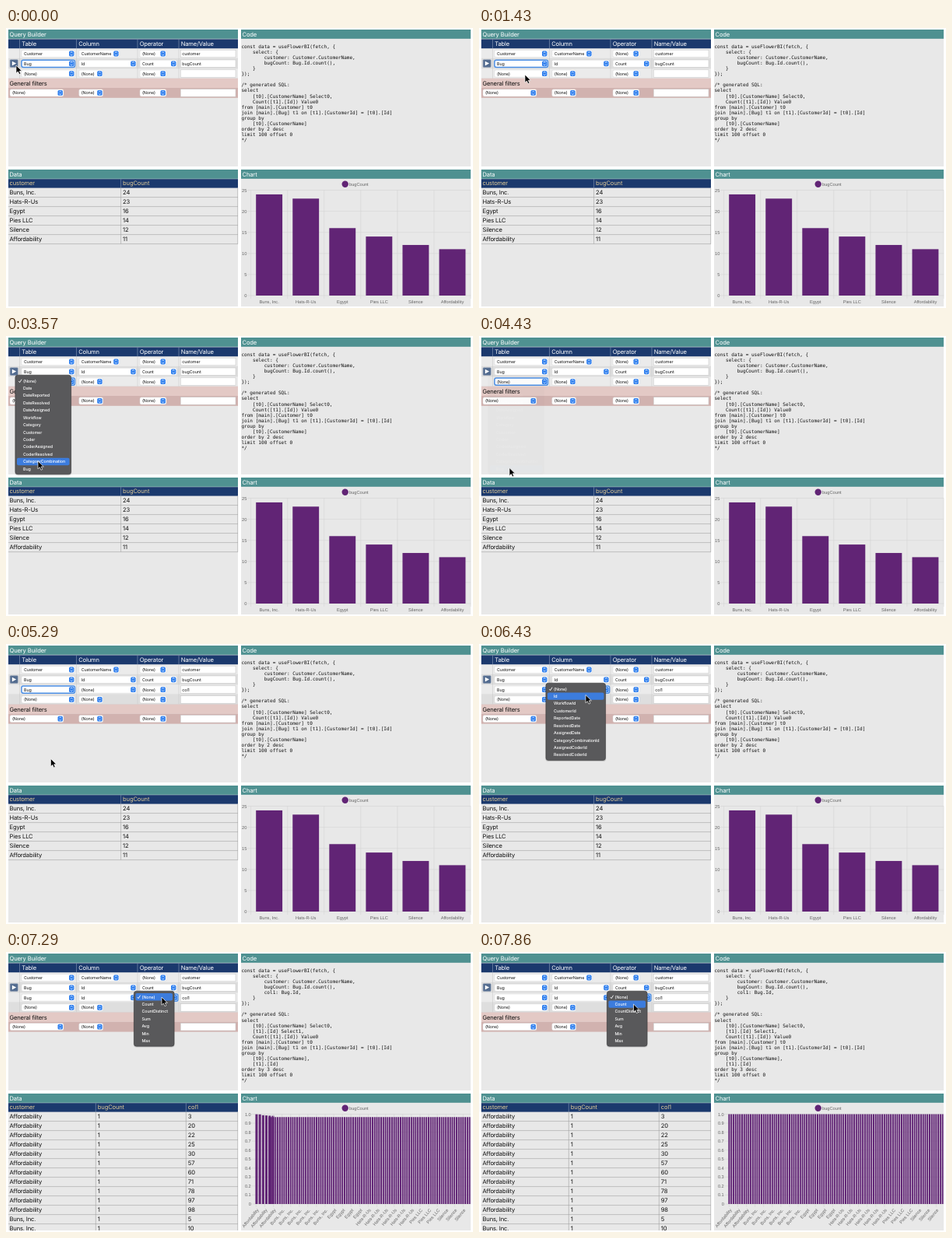
Recreate the animation shown at these times as an HTML page. Size 600 by 360 pixels, loop 8000 ms.

```html
<!DOCTYPE html>
<html lang="en">
<head>
<meta charset="utf-8">
<title>Query builder</title>
<style>
  html, body { margin: 0; width: 100%; height: 100%; overflow: hidden; background: #fff; }
  svg { display: block; width: 600px; height: 360px; }
  text { font: 7.6px Inter, "Noto Sans", sans-serif; letter-spacing: -.02em; fill: #111; text-rendering: geometricPrecision; }
  .light { fill: #fff; }
  .gold { fill: #dcc896; }
  .small { font-size: 5.4px; }
  .item { font-size: 5.35px; font-weight: 500; fill: #fff; }
  .code { font: 6.08px "DejaVu Sans Mono", monospace; letter-spacing: 0; }
  .axis { font: 5.7px "Liberation Sans", Arial, sans-serif; letter-spacing: 0; fill: #666; }
  .end { text-anchor: end; }
  .mid { text-anchor: middle; }
</style>
</head>
<body>
<svg id="stage" viewBox="0 0 600 360" xmlns="http://www.w3.org/2000/svg"></svg>
<script>
const LOOP = 8000, FPS = 7;
const TEAL = '#4f9191', NAVY = '#1b396d', GREY = '#e8e8e8', PURPLE = '#612475';
// Frame numbers of the hard changes
const TABLE_OPEN = 14, TABLE_PICK = 30, ROW_ADDED = 32;
const COLUMN_OPEN = 43, COLUMN_PICK = 47, OPERATOR_OPEN = 50;
const CHART_START = 6710, CHART_TIME = 1000;

const MENUS = [
  { x: 12, w: 71.5, open: TABLE_OPEN, fade: TABLE_PICK, items: ['(None)', 'Date', 'DateReported',
    'DateResolved', 'DateAssigned', 'Workflow', 'Category', 'Customer', 'Coder', 'CoderAssigned',
    'CoderResolved', 'CategoryCombination', 'Bug'] },
  { x: 86, w: 76.5, open: COLUMN_OPEN, fade: COLUMN_PICK, items: ['(None)', 'Id', 'WorkflowId',
    'CustomerId', 'ReportedDate', 'ResolvedDate', 'AssignedDate', 'CategoryCombinationId',
    'AssignedCoderId', 'ResolvedCoderId'] },
  { x: 164.5, w: 51.5, open: OPERATOR_OPEN, fade: Infinity, items: ['(None)', 'Count',
    'CountDistinct', 'Sum', 'Avg', 'Min', 'Max'] }
];

// Pointer stops: frame, x, y
const PATH = [[0, 13, 48], [3, 13, 48], [10, 59, 60], [14, 59, 57.5], [18, 49, 124], [20, 49, 125],
  [27, 39, 169.5], [35, 39, 169.5], [42, 132, 58], [45, 137, 65.5], [46, 137, 65.5],
  [50, 200, 58], [51, 200, 58], [55, 198.5, 67]];

const TOTALS = [['Buns, Inc.', 24], ['Hats-R-Us', 23], ['Egypt', 16], ['Pies LLC', 14],
  ['Silence', 12], ['Affordability', 11]];
const GROUPS = [...TOTALS].sort((a, b) => a[0] < b[0] ? -1 : 1);
const NAMES = GROUPS.flatMap(([name, n]) => Array(n).fill(name));
const IDS = [3, 20, 22, 25, 30, 57, 60, 71, 78, 97, 98, 5, 10];

const lerp = (a, b, p) => a + (b - a) * p;
const range = n => [...Array(n).keys()];
const each = (list, fn) => list.map(fn).join('');
const rect = (x, y, w, h, fill, more = '') =>
  `<rect x="${x}" y="${y}" width="${w}" height="${h}" fill="${fill}" ${more}/>`;
const line = (x1, y1, x2, y2, color, w = .6) =>
  `<path d="M${x1} ${y1}L${x2} ${y2}" stroke="${color}" stroke-width="${w}"/>`;
const text = (x, y, s, cls = '', more = '') =>
  `<text x="${x}" y="${y}" class="${cls}" ${more}>${s}</text>`;

function panel(x, y, title) {
  return rect(x, y, 295, 176, GREY) + rect(x, y, 295, 11.8, TEAL) +
    text(x + 1.5, y + 9, title, 'light');
}

function select(x, w, cy, label, focused) {
  const sx = x + w - 7.5;
  return rect(x, cy - 4.6, w, 9.2, '#fff',
      focused ? 'rx="2.2" stroke="#4b8fe6" stroke-width="1.5"' : 'rx="2" stroke="#cfcfcf" stroke-width=".4"') +
    text(x + 3, cy + 2, label, 'small') +
    rect(sx, cy - 3.4, 6.4, 6.8, '#2f7fee', 'rx="1.6"') +
    `<path d="M${sx + 1.8} ${cy - .8}l1.4 -1.5l1.4 1.5m0 1.6l-1.4 1.5l-1.4 -1.5" fill="none" stroke="#fff" stroke-width=".7"/>`;
}

const input = (cy, label) =>
  rect(224.3, cy - 4.8, 70.7, 9.6, '#fff', 'stroke="#c4c4c4" stroke-width=".5"') +
  text(226.3, cy + 2, label, 'small');

function builder(f) {
  const added = f >= ROW_ADDED, picked = f >= COLUMN_PICK;
  const none = '(None)';
  const focus = f < TABLE_OPEN ? [1, 0] : f < COLUMN_OPEN ? [2, 0] : f < OPERATOR_OPEN ? [2, 1] : [2, 2];
  // Each select is [label, width]
  const rows = [
    [['Customer', 68.5], ['CustomerName', 52], [none, 34], 'customer'],
    [['Bug', 68.5], ['Id', 74], ['Count', 47.5], 'bugCount'],
    added
      ? [['Bug', 68.5], [picked ? 'Id' : none, 74], [none, picked ? 49 : 34], 'col1']
      : [[none, 68.5], [none, 31], [none, 34], '']
  ];
  if (added) rows.push([[none, 68.5], [none, 31], [none, 34], '']);
  const xs = [20, 93.7, 172], cols = [17.5, 90.5, 169, 222];
  const bottom = added ? 77.6 : 64.8;

  let s = panel(3, 2, 'Query Builder') + rect(3, 14.4, 295, 12, NAVY);
  s += each(['Table', 'Column', 'Operator', 'Name/Value'], (h, i) => text(cols[i] + 2.7, 23, h, 'light'));
  s += each(rows, (row, r) => {
    const cy = 33 + r * 12.8;
    return rect(3, cy - 6.4, 295, 12.8, r % 2 ? '#dedede' : '#ebebeb') +
      line(3, cy + 6.4, 298, cy + 6.4, '#c6c6c6', .5) +
      each(xs, (x, c) => select(x, row[c][1], cy, row[c][0], focus[0] === r && focus[1] === c)) +
      input(cy, row[3]);
  });
  s += each(cols, x => line(x, 14.4, x, 26.4, '#8a9ab8') + line(x, 26.4, x, bottom, '#c6c6c6', .5));
  s += rect(5.2, 40.8, 10, 9.6, '#526b8f', 'rx=".8" stroke="#8b9bb3" stroke-width=".6"') +
    '<path d="M7.8 42.7l5.4 2.9l-5.4 2.9z" fill="#fff"/>';

  const fy = bottom + 18.6;
  s += rect(3, bottom, 295, 12.2, '#e3c9c5') + text(4.5, bottom + 9, 'General filters') +
    rect(3, bottom + 12.2, 295, 12.8, '#d1b2af') +
    select(5, 69, fy, none) + select(93.7, 31, fy, none) + select(172, 34, fy, none) + input(fy, '');
  return s;
}

function code(f) {
  const extra = f >= COLUMN_PICK;
  const lines = [
    'const data = useFlowerBI(fetch, {',
    '    select: {',
    '        customer: Customer.CustomerName,',
    '        bugCount: Bug.Id.count(),',
    extra && '        col1: Bug.Id,',
    '    }',
    '});',
    '',
    '/* generated SQL:',
    'select',
    '    [t0].[CustomerName] Select0,',
    extra && '    [t1].[Id] Select1,',
    '    Count([t1].[Id]) Value0',
    'from [main].[Customer] t0',
    'join [main].[Bug] t1 on [t1].[CustomerId] = [t0].[Id]',
    'group by',
    '    [t0].[CustomerName]' + (extra ? ',' : ''),
    extra && '    [t1].[Id]',
    `order by ${extra ? 3 : 2} desc`,
    'limit 100 offset 0',
    '*/'
  ].filter(l => l !== false);
  return panel(302, 2, 'Code') + each(lines, (l, i) => {
    const indent = Math.max(0, l.search(/\S/));
    return text(302.4 + indent * 3.66, 26 + i * 7.06, l.trim(), 'code');
  });
}

function data(f) {
  const detail = f >= COLUMN_PICK;
  const heads = detail ? ['customer', 'bugCount', 'col1'] : ['customer', 'bugCount'];
  const cols = detail ? [2, 115.3, 231.3] : [2, 147.6];
  const rows = detail ? IDS.map((id, i) => [NAMES[i], 1, id]) : TOTALS;
  const bottom = Math.min(358, 205.6 + rows.length * 12);
  return panel(3, 182, 'Data') + rect(3, 194.2, 295, 11.4, NAVY) +
    each(heads, (h, i) => text(cols[i] + 2.5, 202.2, h, 'gold')) +
    each(rows, (row, r) => each(row, (v, c) => text(cols[c] + 2.5, 214.3 + r * 12, v)) +
      line(3, 217.6 + r * 12, 298, 217.6 + r * 12, '#a2a2a2')) +
    each(cols.slice(1), x => line(x, 194.2, x, 205.6, '#8a9ab8') + line(x, 205.6, x, bottom, '#a2a2a2')) +
    line(297.7, 205.6, 297.7, bottom, '#a2a2a2');
}

const TOP = 208.5, RIGHT = 597;
const slot = (left, n, i) => {
  const w = (RIGHT - left) / n;
  return { x: left + (i + .5) * w, w: w * .72 };
};
const bar = (x, w, base, h) => rect(x - w / 2, base - h, w, h, PURPLE);
const GRID = '#d3d3d3';

function scale(left, base, labels) {
  const step = (base - TOP) / (labels.length - 1);
  return each(labels, (l, i) => line(left - 4.5, TOP + i * step, RIGHT, TOP + i * step, GRID) +
    text(left - 5.2, TOP + 2 + i * step, l, 'axis end'));
}

function totalsChart() {
  const left = 314.6, base = 344, w = (RIGHT - left) / 6;
  return scale(left, base, [25, 20, 15, 10, 5, 0]) +
    each(range(7), i => line(left + i * w, TOP, left + i * w, base + 4, GRID)) +
    each(TOTALS, ([name, n], i) => {
      const b = slot(left, 6, i);
      return bar(b.x, b.w, base, n / 25 * (base - TOP)) + text(b.x, 354.2, name, 'axis mid');
    });
}

function detailChart(time) {
  const left = 320, base = 324, count = NAMES.length;
  const t = Math.min(1, Math.max(0, (time - CHART_START) / CHART_TIME));
  const p = 1 - (1 - t) ** 4;
  const labels = range(11).map(i => i === 10 ? '0' : (1 - i / 10).toFixed(1));
  return scale(left, base, labels) + each(NAMES, (name, i) => {
    const to = slot(left, count, i);
    const old = i < TOTALS.length ? slot(314.6, 6, i) : to;
    const from = i < TOTALS.length ? TOTALS[i][1] / 25 : 0;
    const label = i % 4 ? '' : line(to.x, TOP, to.x, base + 4, GRID) +
      text(0, 0, name, 'axis end', `transform="translate(${to.x + 3.6} 332) rotate(-50)"`);
    return label + bar(lerp(old.x, to.x, p), lerp(old.w, to.w, p), base, lerp(from, 1, p) * (base - TOP));
  });
}

function chart(f, time) {
  return panel(302, 182, 'Chart') +
    `<circle cx="435.7" cy="200.7" r="4.2" fill="${PURPLE}"/>` + text(441, 202.7, 'bugCount', 'axis') +
    (f >= COLUMN_PICK ? detailChart(time) : totalsChart());
}

function pointer(f) {
  const k = Math.max(1, PATH.findIndex(s => s[0] >= f));
  const [a, b] = [PATH[k - 1], PATH[k]];
  const u = (f - a[0]) / (b[0] - a[0]), e = u * u * (3 - 2 * u);
  return [lerp(a[1], b[1], e), lerp(a[2], b[2], e)];
}

function menu(m, f, y) {
  const opacity = f < m.open ? 0 : f < m.fade ? 1 : f === m.fade ? .4 : f === m.fade + 1 ? .02 : 0;
  if (!opacity) return '';
  const pitch = 9.43, top = 53;
  const hover = Math.floor((y - top) / pitch);
  return `<g opacity="${opacity}">` +
    rect(m.x - .8, 50.6, m.w + 1.6, m.items.length * pitch + 6, '#000', 'rx="4" opacity=".18"') +
    rect(m.x, 50.2, m.w, m.items.length * pitch + 5, '#59595b', 'rx="3.2" stroke="#3d3d3f" stroke-width=".6"') +
    each(m.items, (item, i) => {
      const iy = top + i * pitch;
      return (i === hover ? rect(m.x + 2, iy, m.w - 4, pitch, '#3c7cdd', 'rx="1.8"') : '') +
        text(m.x + 10, iy + 6.6, item, 'item');
    }) +
    `<path d="M${m.x + 4.3} 58l1.3 1.7l2.5 -4" fill="none" stroke="#fff" stroke-width=".9"/></g>`;
}

function scene(f) {
  const [x, y] = pointer(f);
  return rect(0, 0, 600, 360, '#fff') + builder(f) + code(f) + data(f) + chart(f, f * 1000 / FPS) +
    rect(0, 358, 600, 2, '#fff') +
    each(MENUS, m => menu(m, f, y)) +
    `<path transform="translate(${x} ${y})" d="M0 0V10.2L2.4 8L4 11.6L5.8 10.8L4.3 7.3H7.4Z" fill="#000" stroke="#fff" stroke-width=".7" stroke-linejoin="round"/>`;
}

const stage = document.getElementById('stage');
const start = performance.now();
let shown = -1;

function draw() {
  const time = (performance.now() - start) % LOOP;
  const f = Math.floor((time + 10) * FPS / 1000) % (LOOP * FPS / 1000);
  if (f !== shown) stage.innerHTML = scene(shown = f);
  requestAnimationFrame(draw);
}
draw();
</script>
</body>
</html>
```
